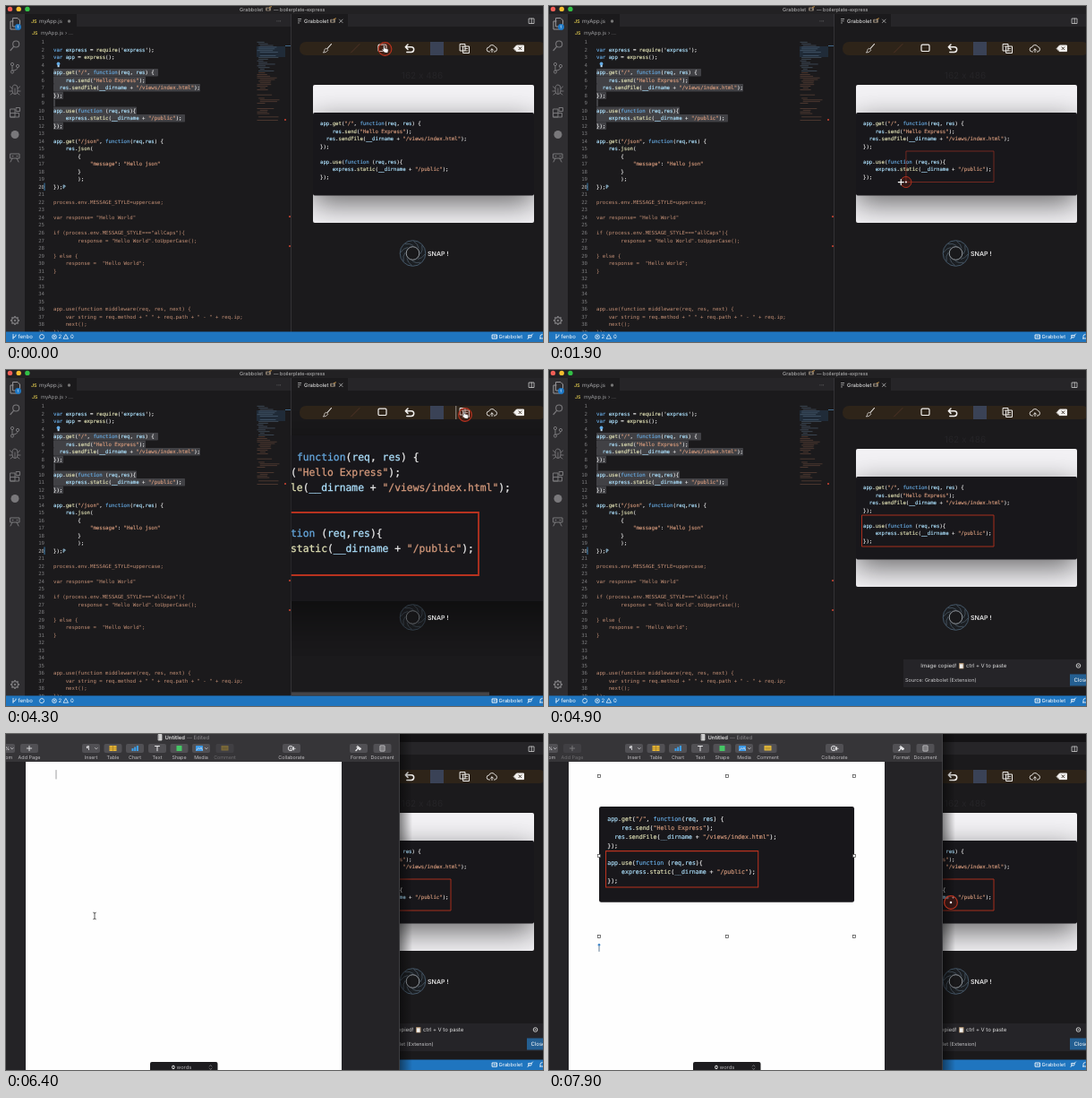
An HTML page for the animation above (8 s loop, 600 by 375 pixels).

```html
<!DOCTYPE html>
<html lang="en">
<head>
<meta charset="utf-8">
<title>Code snapshot</title>
<style>
html, body { margin: 0; width: 100%; height: 100%; overflow: hidden; background: #1b1a1c; }
svg { display: block; width: 100vw; height: 100vh; }
text { font-family: Inter, Roboto, sans-serif; white-space: pre; text-rendering: geometricPrecision; }
.code { font-family: "DejaVu Sans Mono", monospace; font-size: 5.68px; stroke-width: .13px; }
.idle { opacity: .38; filter: grayscale(1); }
.dim { opacity: .4; }
</style>
</head>
<body>
<svg id="stage" viewBox="0 0 600 375" preserveAspectRatio="none"></svg>
<script>
const LOOP = 8000, APP = 'Grabbolet', RED = '#b8321f';

// Drawing helpers
const rect = (x, y, w, h, fill, r = 0, more = '') =>
  `<rect x="${x}" y="${y}" width="${w}" height="${h}" rx="${r}" fill="${fill}" ${more}/>`;
const circle = (x, y, r, fill, more = '') =>
  `<circle cx="${x}" cy="${y}" r="${r}" fill="${fill}" ${more}/>`;
const line = (d, stroke = '#8b8b8d', w = 1, fill = 'none') =>
  `<path d="${d}" fill="${fill}" stroke="${stroke}" stroke-width="${w}" stroke-linecap="round" stroke-linejoin="round"/>`;
const text = (x, y, s, size = 6, fill = '#ddd', more = '') =>
  `<text x="${x}" y="${y}" font-size="${size}" fill="${fill}" ${more}>${s}</text>`;
const group = (s, more = '') => `<g ${more}>${s}</g>`;
const END = 'text-anchor="end"', MID = 'text-anchor="middle"';

const TOKEN = /("[^"]*")|\b(var|function)\b|(\w+)(?=\()|([A-Za-z_]\w*)|([^\w"]+|\d+)/g;
const INK = ['#d59a7c', '#66a9e0', '#e2e2b6', '#aee2ff', '#ececec'];
const paint = s => s.replace(TOKEN, (m, ...g) => {
  const ink = INK[g.findIndex((v, i) => i < 5 && v)];
  return `<tspan fill="${ink}" stroke="${ink}">${m}</tspan>`;
});
const codeLine = (x, y, s, plain) =>
  `<text class="code" x="${x}" y="${y}" fill="#c49076">${plain ? s : paint(s)}</text>`;

const SNIPPET = [
  'app.get("/", function(req, res) {',
  '    res.send("Hello Express");',
  '  res.sendFile(__dirname + "/views/index.html");',
  '});',
  '',
  'app.use(function (req,res){',
  '    express.static(__dirname + "/public");',
  '});'
];
const SOURCE = [
  '', 'var express = require(\'express\');', 'var app = express();', '', ...SNIPPET, '',
  'app.get("/json", function(req,res) {', '    res.json(', '        {',
  '            "message": "Hello json"', '        }', '        );', '});P', '',
  'process.env.MESSAGE_STYLE=uppercase;', '', 'var response= "Hello World"', '',
  'if (process.env.MESSAGE_STYLE==="allCaps"){',
  '        response = "Hello World".toUpperCase();', '', '} else {',
  '    response =  "Hello World";', '}', '', '', '', '',
  'app.use(function middleware(req, res, next) {',
  '    var string = req.method + " " + req.path + " - " + req.ip;', '    next();', '});'
];

const camera = (x, y) =>
  rect(x, y - 1.8, 6, 4, '#85796b', 1) + circle(x + 2.8, y + .3, 1.2, '#2c2c2e') +
  line(`M${x + 4.5} ${y - 2}l2 -.6`, '#d9a04a', .9);

function editor() {
  const rowY = i => 40 + i * 8.52;
  let s = rect(0, 0, 600, 375, '#1b1a1c') + rect(0, 0, 600, 9, '#222123') +
    rect(0, 9, 600, 14, '#262528') + rect(21, 9, 58, 14, '#1b1a1c') +
    rect(0, 9, 21, 355, '#2f2e31');
  ['#f35f57', '#f5bd2f', '#32c146'].forEach((c, i) => { s += circle(4.5 + 9.7 * i, 3.4, 2.7, c); });
  s += text(261, 5.5, APP, 5.6, '#bbb') + camera(290, 3.4) +
    text(299, 5.5, '— boilerplate-express', 5.5, '#bbb');
  s += text(28, 19, 'JS', 5.4, '#d8c24c', 'font-weight="600"') + text(37, 19, 'myApp.js', 6, '#a9a9ab') +
    circle(70.5, 17, 1.7, '#777') + text(302, 18.8, '···', 6, '#aaa', 'font-weight="600"');
  s += text(29, 32.2, 'JS', 5.2, '#d8c24c', 'font-weight="600"') +
    text(39, 32.2, 'myApp.js', 5.8, '#98989a') + text(66, 32.2, '› ...', 5.8, '#98989a');

  [117, 103, 164, 11, 2, 93, 147, 11].forEach((w, i) => {
    s += rect(53, rowY(i + 4) - 4.2, w, 8.5, '#414145', .8);
  });
  SOURCE.forEach((row, i) => {
    s += `<text class="code" x="43" y="${rowY(i) + 2}" fill="${i === 19 ? '#c4c4c4' : '#7c7c7e'}" ${END}>${i + 1}</text>`;
    s += codeLine(53, rowY(i) + 2, row, i > 20);
  });
  s += circle(58.5, 64.5, 1.9, '#62a9e3') + rect(57.6, 66, 2, 2.2, '#b9d6ee') +
    rect(42.5, 197.5, 1, 8.5, '#3c7fae');

  // Minimap
  let seed = 7;
  const rnd = () => (seed = seed * 16807 % 2147483647) / 2147483647;
  s += rect(280, 45, 32, 12, '#2a4563', 0, 'opacity=".4"');
  for (let y = 38; y < 128; y += 1.9) {
    if (rnd() < .16) continue;
    const x = 280.5 + Math.floor(rnd() * 3) * 1.6;
    s += rect(x, y, 4 + rnd() * 20, .7, y < 74 ? '#65819a' : '#8a5e49', 0, 'opacity=".6"');
  }
  s += rect(312, 44, 6, .8, '#4d7fa8') + [127, 235, 268].map(y => rect(y < 200 ? 311 : 316, y - 1, 2, 2, '#a43a2c')).join('');
  s += rect(318, 9, .8, 355, '#3a393c');
  return s + sideBar() + statusBar();
}

function sideBar() {
  const g = '#79787b';
  let gear = '';
  for (let i = 0; i < 8; i++) gear += `<path d="M10 346v1.500" stroke="${g}" stroke-width="1.8" transform="rotate(${i * 45} 10 351)"/>`;
  return line('M8 13.5h5l2.500 2.500v7h-7.500zM8 17h-3v9h7v-3', '#98979a', 1) + circle(13.5, 23.500, 3.4, '#1f7ac8') +
    text(13.5, 25.2, '1', 4.6, '#fff', MID) +
    circle(11.2, 42.5, 3.5, 'none', `stroke="${g}" stroke-width="1.1"`) + line('M8.600 45.300L5 49.500', g, 1.2) +
    [[7, 65], [7, 73.5], [13, 67]].map(p => circle(...p, 1.6, 'none', `stroke="${g}"`)).join('') +
    line('M7 66.600v5.300M13 68.600q0 3-5 3.500', g) +
    line('M7 92q0-4 3-4t3 4v3q0 3.500-3 3.500t-3-3.500zM10 92v6M7 92l-2.500-2M13 92l2.500-2M7 95h-3M13 95h3M7.500 97l-2.500 2M12.500 97l2.500 2', g, .9) +
    line('M5 115h5v9h-5zM5 119.500h9.500v4.500h-9.500zM11.500 113.500h4v4h-4z', g, 1) +
    circle(10, 143.500, 4.5, g) +
    line('M5 165h10v5h-10zM7 167.500h1M12 167.500h1M7 170l-2 4M12 170l2 4', g, 1) +
    gear + circle(10, 351, 3.4, 'none', `stroke="${g}" stroke-width="1.2"`) + circle(10, 351, 1.2, g);
}

function statusBar() {
  const w = '#fff';
  return rect(0, 363.500, 600, 11.500, '#1f75bf') +
    line('M8 366.500v5M11 367v1q0 1.500-3 2', w, .8) + text(13.500, 371.300, 'fenbo', 6, w) +
    line('M37.500 369a2.600 2.600 0 0 1 5-.8M42.500 369.500a2.600 2.600 0 0 1-5 .6', w, .8) +
    circle(54, 369.200, 2.4, 'none', `stroke="${w}" stroke-width=".7"`) + line('M53 368.200l2 2M55 368.200l-2 2', w, .6) +
    text(58.5, 371.300, '2', 6, w) + line('M67 366.800l2.500 4.500h-5z', w, .7) + text(72, 371.300, '0', 6, w) +
    line('M543.500 367h5v4.200h-5zM545 369h2', w, .9) + text(550.5, 371.300, APP, 5.7, w) +
    line('M583 371.500l1.500-2.500M584 367.500h3.500l-1 2.500h-2zM587.500 367l1-1', w, .8) +
    line('M596.500 371h4M597 371v-2.500q0-2 2-2', w, .8);
}

const cardBody = mark =>
  rect(343, 119, 247, 92.500, '#18171b', 2) +
  SNIPPET.map((row, i) => codeLine(351, 133 + i * 8.5, row)).join('') + mark;

function panel() {
  const w = '#f2f0ee';
  let blades = '';
  for (let i = 0; i < 8; i++) blades += `<path d="M455.500 262.500q5 3 5.500 8" transform="rotate(${i * 45} 454.500 276)" fill="none" stroke="#66788a" stroke-width=".5"/>`;
  const head = rect(319, 9, 63, 14, '#1b1a1c') +
    line('M326.500 14.500h3.200M326.500 16.700h2.700M326.500 18.900h1', '#bbb', .8) + text(333, 19, APP, 5.9, '#eee') + camera(362, 16.500) +
    line('M372.500 15l3.600 3.600M376.100 15l-3.600 3.600', '#ccc', .7) +
    line('M584.500 14h5.500v5.500h-5.500zM587.200 14v5.500', '#ccc', .8);
  const snap = group(circle(454.500, 276, 14.300, '#1b1e22', 'stroke="#50667a" stroke-width=".8"') + blades +
    circle(454.500, 276, 7.300, '#19191b', 'stroke="#b4bcc3" stroke-width=".8"'), 'id="aperture"') +
    text(471, 278.500, 'SNAP !', 7.100, '#fff', 'font-weight="500"');
  const tools = rect(328, 40, 275, 15, '#2e2419', 7) +
    line('M363.500 42.500l-4.500 5', w, 1.1) + line('M358 47.500l1.800 1.800q-2 3-5.500 2.700q1.800-1 1.600-3z', w, .7) +
    line('M385.500 52l9.500-9.500', '#5d3a2c', .7) +
    rect(416, 43.200, 9, 7.300, 'none', 1.3, `stroke="${w}" stroke-width="1.2"`) +
    line('M449 43l-2.700 2.700l2.700 2.700M446.800 45.700h6a2.800 2.800 0 0 1 0 5.800h-5', w, 1.5) +
    rect(474, 40, 15, 15, '#3a4256') +
    line('M507.500 42.500h5.500v7.500h-5.500zM511 45h6.500v7.500h-6.500z', w, 1, '#2e2419') + line('M509 45h1M513 47.500h2.800M513 50h2.800', w, .8) +
    line('M540.500 51h-.8a2.500 2.500 0 0 1 0-5a3.500 3.500 0 0 1 6.500-.5a2.800 2.800 0 0 1 0 5.500h-.8M543 51.500v-3.500M541.500 49.300l1.500-1.500l1.500 1.500', w, .9) +
    line('M567.500 47.300l3-3.300h8v6.600h-8z', w, 1, w) + line('M573 45.900l2.800 2.800M575.800 45.900l-2.800 2.800', '#2e2419', .9) +
    rect(502.500, 40, .7, 15, '#c9c4bf', 0, 'id="hover"');
  const card = group(
    group(rect(343, 88, 247, 154, '#f2f1f4', 2), 'id="paper"') +
    group(rect(343, 128.500, 247, 92, '#000', 0, 'opacity=".58" filter="url(#blur)"'), 'clip-path="url(#cardClip)"') +
    cardBody('<path id="mark" fill="none"/>'), 'id="card"');
  return head + group(text(465, 80.500, '162 x 486', 10, '#252427', MID) + card, 'clip-path="url(#panelClip)"') + tools + snap +
    rect(319, 359.500, 221, 4, '#454447', 0, 'id="scroller"');
}

const notice = () =>
  rect(396, 323, 210, 31, '#252428') +
  text(455.500, 332, 'Image copied!', 6, '#ddd', END) +
  rect(458, 327, 5.500, 6.600, '#a58a6c', .8) + rect(459, 328.300, 3.500, 4.500, '#eee') +
  text(466, 332, 'ctrl + V to paste', 6, '#ddd') +
  circle(591.500, 330, 2.300, 'none', 'stroke="#ccc" stroke-width="1"') + circle(591.500, 330, .8, '#ccc') +
  text(477.500, 348, `Source: ${APP} (Extension)`, 5.600, '#c8c8ca', END) +
  rect(582, 339.500, 30, 13, '#245f92') + text(586.500, 348.200, 'Close', 6, '#fff');

function writer() {
  const w = '#e6e6e8';
  const button = (x, label, icon, id = '', wide = 20) => group(
    rect(x - wide / 2, 11, wide, 10, '#515054', 2) + icon + text(x, 28, label, 5.400, '#c0bfc2', MID), id && `id="${id}"`);
  const chevron = (x, y) => line(`M${x} ${y}l1.300 1.300l1.300-1.300`, w, .7);
  const bar =
    line('M170.500 .5h3.500v6.500h-3.500z', '#ddd', .8, '#ccc') + text(177.500, 5.700, 'Untitled', 5.900, '#ddd', 'font-weight="600"') +
    text(202, 5.700, '— Edited', 5.900, '#8d8c8f') + group(chevron(232, 3), 'id="titleArrow"') +
    button(0, 'Zoom', text(-1, 18, '%', 5, w) + chevron(5.500, 15.500)) +
    button(26, 'Add Page', line('M26 13.300v5.400M23.300 16h5.400', w, .9), 'addPage') +
    button(95, 'Insert', text(89.500, 18.300, '¶', 6.500, w, 'font-weight="700"') + chevron(99.500, 15.500)) +
    button(119.500, 'Table', rect(115.500, 13, 8, 6, '#eab836') + line('M115.500 15h8M115.500 17h8M119.500 13v6', '#8a6920', .5)) +
    button(144, 'Chart', rect(140.500, 16, 2, 3, '#3da0ec') + rect(143.200, 14.500, 2, 4.500, '#3da0ec') + rect(145.900, 13, 2, 6, '#3da0ec')) +
    button(169, 'Text', line('M166.500 13.500h5M169 13.500v5.300', w, 1)) +
    button(193.500, 'Shape', rect(190.500, 13, 6, 6, '#45c765', .6)) +
    button(218, 'Media', rect(212, 13, 8, 6, '#3f9be8', .6) + line('M213 18l2-2.500l1.500 1.500l1.500-2l1.500 3', w, .7) + chevron(222.500, 15.500)) +
    button(244.500, 'Comment', rect(240.500, 13, 8, 5.500, '#e6bb3c', .6) + line('M242 15h5M242 16.700h5', '#7d6420', .5), 'comment') +
    button(319, 'Collaborate', circle(318, 16, 2.700, 'none', `stroke="${w}" stroke-width=".9"`) + line('M318 15v2.500M321.500 14.500v3.500M319.800 16.300h3.400', w, .8)) +
    button(394, 'Format', line('M391 18.500l3-3', w, 1.500) + line('M393 13.500l4 3l-2 1.500l-3-3z', w, .8, w)) +
    button(420.500, 'Document', rect(418, 13, 5, 6, 'none', .4, `stroke="${w}" stroke-width=".8"`) + line('M419.300 15h2.400M419.300 17h2.400', w, .6));
  let handles = '';
  for (const y of [47, 136, 226]) for (const x of [56, 199, 341])
    if (x !== 199 || y !== 136) handles += rect(x - 1.500, y - 1.500, 3, 3, '#fff', 0, 'stroke="#444" stroke-width=".7"');
  const redBox = line('M349.500 162h147.500v35h-147.500z', RED, .9);
  return rect(439, 0, 161, 9, '#141315') + rect(440, 0, 14, 375, 'url(#shade)') +
    rect(0, 0, 440, 375, '#242326') + rect(0, 0, 440, 31, '#2b2a2c', 0, 'id="barBack"') +
    rect(22, 31, 353, 344, '#fefefe') + rect(439.300, 0, .7, 375, '#4a494c') +
    group(bar, 'id="bar"') +
    group(line('M56 40.500v9.500', '#77777a', .7), 'id="caret"') +
    group(group(cardBody(redBox), 'transform="translate(56 81) scale(1.154) translate(-343 -119)"') + handles +
      line('M56 235.500v7', '#53718c', .9) + circle(56, 235.300, 1.300, '#3f86c8'), 'id="pasted"') +
    rect(161, 366, 75.500, 12, '#1d1c1f', 2) + text(185, 374, '0', 5.800, '#fff', 'font-weight="700"') +
    text(190.500, 374, 'words', 5.800, '#b5b4b7') + line('M227.300 371l1.300-1.500l1.300 1.500M227.300 373l1.300 1.500l1.300-1.500', '#999', .6);
}

const cursors =
  group(circle(0, 0, 7, '#7a1d12', `fill-opacity=".3" stroke="${RED}" stroke-width="1.100"`) + circle(0, 0, 1.200, '#fff', 'id="dot"'), 'id="ring"') +
  group(
    group(line('M-.8 3.800l-2.600-3.300q0-1.200 1.600 0v-3.800q.8-1.200 1.500 0v2.400l3.300.9q1 .5.6 2l-.7 2.300z', '#222', .5, '#fff'), 'id="hand"') +
    group(line('M-3 0h6M0-3v6', '#222', 1.900) + line('M-3 0h6M0-3v6', '#fff', 1.100), 'id="cross"') +
    group(line('M-1.300-3.800q1.300 0 1.300 1v5.600q0 1-1.300 1M1.300-3.800q-1.300 0-1.300 1M0 2.800q0 1 1.300 1', '#333', .8), 'id="beam"'), 'id="pointer"');

const stage = document.getElementById('stage');
stage.innerHTML = `<defs>
  <filter id="blur" x="-30%" y="-80%" width="160%" height="260%"><feGaussianBlur stdDeviation="16"/></filter>
  <clipPath id="cardClip"><rect x="343" y="88" width="247" height="154" rx="2"/></clipPath>
  <clipPath id="panelClip"><rect x="318.800" y="23" width="282" height="340.500"/></clipPath>
  <linearGradient id="shade"><stop stop-opacity=".45"/><stop offset="1" stop-opacity="0"/></linearGradient>
</defs>` + editor() + panel() + group(notice(), 'id="notice"') + group(writer(), 'id="writer"') + cursors;

const el = {};
stage.querySelectorAll('[id]').forEach(n => { el[n.id] = n; });
const show = (name, on) => { el[name].style.display = on ? '' : 'none'; };
const within = (t, ...spans) => spans.some(([a, b]) => t >= a && t < b);

// Pointer route: time, x, y
const ROUTE = [
  [0, 423.500, 48], [250, 423.500, 48], [950, 497, 162], [1150, 497, 162],
  [1900, 399, 196.500], [2600, 349.500, 197], [2950, 349.500, 197], [3350, 500, 130],
  [3550, 500, 130], [4150, 513, 50], [4700, 513, 50], [5150, 235, 5], [5450, 235, 5],
  [6200, 99, 203], [7400, 99, 203], [7800, 449, 188], [8000, 449, 188]
];

// Smooth curve through the route that rests at turning points and holds
const slope = (i, c) => (ROUTE[i + 1][c] - ROUTE[i][c]) / (ROUTE[i + 1][0] - ROUTE[i][0]);
function tangent(i, c) {
  if (i === 0 || i === ROUTE.length - 1) return 0;
  const a = slope(i - 1, c), b = slope(i, c);
  return a * b > 0 ? 2 * a * b / (a + b) : 0;
}
function along(t) {
  const i = Math.max(1, ROUTE.findIndex(p => p[0] >= t)) - 1;
  const a = ROUTE[i], b = ROUTE[i + 1], span = b[0] - a[0], k = (t - a[0]) / span;
  const ease = k * k * (3 - 2 * k);
  return [1, 2].map(c => a[c] + (b[c] - a[c]) * ease +
    span * k * (1 - k) * (tangent(i, c) * (1 - k) - tangent(i + 1, c) * k));
}

const DRAG = [1150, 2750], ZOOM = [4200, 4600], NOTICE = 4700, OPEN = 5000, FOCUS = 5400, PASTE = 7000;

function draw(t) {
  const dragging = within(t, DRAG), zoomed = within(t, ZOOM);
  const [x, y] = along(t);
  const [px, py] = along(Math.min(t + (dragging ? 60 : 0), LOOP));

  const [mx, my] = along(Math.min(t, DRAG[1]));
  show('mark', t >= DRAG[0]);
  el.mark.setAttribute('d', `M497 162H${mx}V${my}H497Z`);
  el.mark.setAttribute('stroke', dragging ? '#9a3025' : RED);
  el.mark.setAttribute('stroke-width', dragging ? .7 : .9);
  el.card.setAttribute('transform', zoomed ? 'translate(-466 -165) scale(2)' : '');
  el.aperture.setAttribute('opacity', zoomed ? .6 : 1);
  show('paper', !zoomed);
  show('scroller', zoomed);
  show('hover', within(t, [4100, 4750]));

  show('notice', t >= NOTICE);
  show('writer', t >= OPEN);
  el.bar.setAttribute('class', t < FOCUS ? 'idle' : '');
  el.barBack.setAttribute('fill', t < FOCUS ? '#2b2a2c' : '#363538');
  el.addPage.setAttribute('class', t < PASTE ? '' : 'dim');
  el.comment.setAttribute('class', t < PASTE ? 'dim' : '');
  show('titleArrow', t < 5700);
  show('caret', within(t, [FOCUS, PASTE]));
  show('pasted', t >= PASTE);

  show('ring', within(t, [0, 250], DRAG, [3300, 3550], [4150, 4450], [7750, LOOP]));
  show('dot', dragging || t > 7700);
  el.ring.setAttribute('transform', `translate(${x} ${y}) scale(${dragging ? .86 : 1.050})`);
  el.pointer.setAttribute('transform', `translate(${px} ${py})`);
  show('hand', within(t, [0, 450], [3950, 4750]));
  show('cross', within(t, [450, 3950]));
  show('beam', within(t, [5700, 7600]));
}

function tick() {
  draw(performance.now() % LOOP);
  requestAnimationFrame(tick);
}
tick();
</script>
</body>
</html>
```
